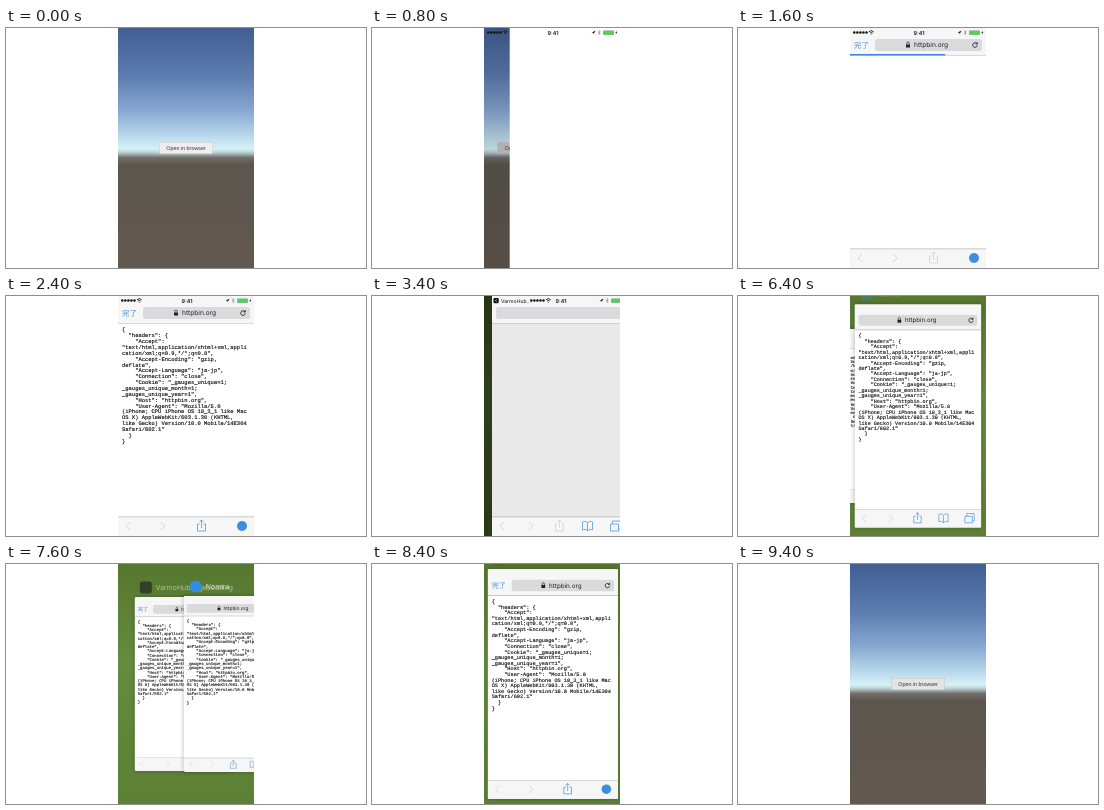
Write an HTML page with a canvas that moves like this. It is 360 px wide and 240 px high and loops after 9600 ms.

```html
<!DOCTYPE html>
<html lang="en">
<head>
<meta charset="utf-8">
<title>Open in browser</title>
<style>
html, body { margin: 0; width: 100%; height: 100%; overflow: hidden; background: #fff; }
canvas { display: block; }
</style>
</head>
<body>
<canvas id="stage" width="360" height="240"></canvas>
<script>
const ctx = document.getElementById('stage').getContext('2d');
ctx.textRendering = 'geometricPrecision';
const LOOP = 9600, STEP = 200, W = 136, H = 240, LEFT = 112;
const BLUE = '#3b8fdf', GREY = '#cdcdcd';
const SANS = 'Inter, "Liberation Sans", sans-serif';
const MONO = '"Liberation Mono", monospace';
const APP = 'VarmoHubPageLoading';

const RESPONSE = `{
  "headers": {
    "Accept":
"text/html,application/xhtml+xml,appli
cation/xml;q=0.9,*/*;q=0.8",
    "Accept-Encoding": "gzip,
deflate",
    "Accept-Language": "ja-jp",
    "Connection": "close",
    "Cookie": "_gauges_unique=1;
_gauges_unique_month=1;
_gauges_unique_year=1",
    "Host": "httpbin.org",
    "User-Agent": "Mozilla/5.0
(iPhone; CPU iPhone OS 10_3_1 like Mac
OS X) AppleWebKit/603.1.30 (KHTML,
like Gecko) Version/10.0 Mobile/14E304
Safari/602.1"
  }
}`.split('\n');

const ICONS = {
  back: 'M2 -4L-2 0L2 4',
  next: 'M-2 -4L2 0L-2 4',
  share: 'M-2 -2H-4V5H4V-2H2M0 2V-6M-2 -4L0 -6L2 -4',
  book: 'M0 -3C-1 -5 -4 -5 -5 -4V4C-4 3 -1 3 0 5C1 3 4 3 5 4V-4C4 -5 1 -5 0 -3V5',
  tabs: 'M-5 -2H3V5H-5ZM-3 -2V-5H5V3H3',
  reload: 'M1.8 -1.4A2.3 2.3 0 1 0 2.3 .4M2.3 -2.8V-1H.6',
  wifi: 'M-2.4 -1A3.4 3.4 0 0 1 2.4 -1M-1.3 .3A1.8 1.8 0 0 1 1.3 .3M-.3 1.5H.3'
};

const clamp = v => Math.min(1, Math.max(0, v));
const mix = (a, b, p) => a + (b - a) * p;
const ramp = (t, from, to) => 1 - (1 - clamp((t - from) / (to - from))) ** 2;

function rect(x, y, w, h, color, radius = 0) {
  ctx.fillStyle = color;
  ctx.beginPath();
  ctx.roundRect(x, y, w, h, radius);
  ctx.fill();
}

function disc(x, y, r, color) {
  ctx.fillStyle = color;
  ctx.beginPath();
  ctx.arc(x, y, r, 0, 7);
  ctx.fill();
}

function text(str, x, y, size, color, { family = SANS, weight = 400, align = 'left', stroke = 0 } = {}) {
  ctx.font = `${weight} ${size}px ${family}`;
  ctx.textAlign = align;
  ctx.fillStyle = ctx.strokeStyle = color;
  ctx.fillText(str, x, y);
  if (stroke) {
    ctx.lineWidth = stroke;
    ctx.strokeText(str, x, y);
  }
}

function shape(path, x, y, color, { width = .7, fill = false } = {}) {
  ctx.save();
  ctx.translate(x, y);
  ctx.fillStyle = ctx.strokeStyle = color;
  ctx.lineWidth = width;
  ctx[fill ? 'fill' : 'stroke'](new Path2D(path));
  ctx.restore();
}

function gradient(y, h, stops) {
  const g = ctx.createLinearGradient(0, y, 0, y + h);
  stops.forEach(([at, color]) => g.addColorStop(at, color));
  return g;
}

function place(x, y, scale, draw) {
  ctx.save();
  ctx.translate(x, y);
  ctx.scale(scale, scale);
  draw();
  ctx.restore();
}

function scene(buttonColor) {
  rect(0, 0, W, H, gradient(0, H, [
    [0, '#425e92'], [.2, '#5c7cb0'], [.34, '#86a6d0'], [.44, '#b4d4ea'],
    [.505, '#d6f1f7'], [.52, '#b5cbcd'], [.54, '#716f69'], [.57, '#5c564f'], [1, '#62584f']
  ]));
  rect(41, 114, 54, 12, '#c2c4c4', 1.2);
  rect(41.5, 114.5, 53, 11, buttonColor, 1);
  text('Open in browser', 68, 122, 5.4, '#323232', { family: '"Liberation Sans", sans-serif', align: 'center' });
}

function statusBar(returnLink) {
  const x = returnLink ? 39.3 : 4.3;
  if (returnLink) {
    rect(1.5, 2, 5.2, 5.2, '#111', 1);
    shape('M.8 -1.3L-.6 0L.8 1.3', 4, 4.6, '#fff', { width: .6 });
    text(APP.slice(0, 8) + '...', 9, 6.6, 5.1, '#111');
  }
  for (let i = 0; i < 5; i++) disc(x + i * 3.05, 4.6, 1.25, '#111');
  shape(ICONS.wifi, x + 17, 4.8, '#111', { width: .9 });
  text('9:41', 69, 6.7, 5.4, '#111', { weight: 600, align: 'center' });
  shape('M2 -2L-2 .2H0V2Z', 109.5, 4.6, '#111', { fill: true });
  shape('M-1 -1L1 1L0 2.2V-2.2L1 -1L-1 1', 115.2, 4.6, '#777', { width: .5 });
  rect(119, 2.4, 11, 4.6, '#8fb591', 1);
  rect(119.4, 2.8, 10.2, 3.8, '#55ce5b', .7);
  shape('M.6 -2L-1 .3H0L-.4 2L1 -.4H0Z', 132.3, 4.6, '#111', { fill: true });
}

function browser({ standalone = false, loaded = true, address = true, bars = true, progress = 0, body = '#fff' }) {
  rect(0, 0, W, H, body);
  if (!bars) return;
  const fieldX = standalone ? 4 : 25, lockX = standalone ? 48 : 58;
  rect(0, 0, W, 27, '#f6f6f6');
  rect(0, 27, W, .6, '#b5b5b5');
  rect(fieldX, 11, 132 - fieldX, 12, '#dadadc', 2.5);
  if (!standalone) text('完了', 4, 19.6, 7.4, BLUE, { family: '"Noto Sans CJK JP", "Noto Sans CJK", sans-serif' });
  if (address) {
    rect(lockX - 2, 16.4, 4, 3.2, '#222', .4);
    shape('M-1.2 1V-.4A1.2 1.2 0 0 1 1.2 -.4V1', lockX, 15.6, '#222');
    text('httpbin.org', lockX + 6, 19.2, 6.6, '#222');
    shape(ICONS.reload, 125, 17, '#222', { width: .9 });
  }
  if (progress) rect(0, 26, W * progress, 1.6, '#3b86e6');
  if (loaded) RESPONSE.forEach((line, i) =>
    text(line, 4, 35.3 + i * 5.87, 5.48, '#111', { family: MONO, stroke: .15 }));

  rect(0, 221, W, 19, '#f6f6f6');
  rect(0, 220.6, W, .6, '#b5b5b5');
  const action = loaded ? BLUE : GREY;
  shape(ICONS.back, 10, 230, GREY);
  if (standalone) {
    shape(ICONS.next, 39, 230, GREY);
    shape(ICONS.share, 67.5, 230, action);
    shape(ICONS.book, 95.5, 230, BLUE);
    shape(ICONS.tabs, 123.5, 230, BLUE);
  } else {
    shape(ICONS.next, 45, 230, GREY);
    shape(ICONS.share, 83.5, 230, action);
    disc(124, 230, 5, BLUE);
  }
}

function wallpaper(dim = 0) {
  rect(0, 0, W, H, gradient(0, H, [[0, '#55772f'], [.4, '#668b3c'], [1, '#5c8034']]));
  if (dim) rect(0, 0, W, H, `rgba(0,0,0,${dim})`);
}

function card(x, y, scale, options) {
  const radius = 11 * (1 - scale);
  place(x, y, scale, () => {
    ctx.save();
    ctx.shadowColor = 'rgba(0,0,0,.3)';
    ctx.shadowBlur = scale < 1 ? 4 : 0;
    rect(0, 0, W, H, '#fff', radius);
    ctx.restore();
    ctx.beginPath();
    ctx.roundRect(0, 0, W, H, radius);
    ctx.clip();
    browser(options);
  });
}

function cardLabel(x, cardY, name, alpha, round) {
  const y = cardY - 9.5;
  ctx.globalAlpha = alpha;
  if (round) disc(x + 6, y, 6, '#2f8fe8');
  else rect(x, y - 6, 12, 12, '#222', 2.5);
  ctx.globalAlpha = alpha * .8;
  text(name, x + 16, y + 2.5, 6.9, '#fff');
  ctx.globalAlpha = 1;
}

// Scene with the in-app browser pushed over it; p = 1 covers the scene.
function push(p, buttonColor, options) {
  place(-34 * p, 0, 1, () => scene(buttonColor));
  if (!p) return;
  rect(0, 0, W, H, `rgba(0,0,0,${.14 * p})`);
  place(W * (1 - p), 0, 1, () => browser(options));
  statusBar(false);
}

function switchApps(t) {
  const p = ramp(t, 3064, 3500), stride = W + 16;
  wallpaper(.55);
  place(-stride * p, 0, 1, () => { browser({}); statusBar(false); });
  place(stride * (1 - p), 0, 1, () => {
    browser({
      standalone: true, loaded: t >= 5200, address: t >= 3800,
      body: t < 4400 ? '#e9e9e9' : '#fff',
      progress: t >= 3800 && t < 5400 ? mix(.1, .905, ramp(t, 3800, 5200)) : 0
    });
    statusBar(true);
  });
}

function switcher(t) {
  const shrink = ramp(t, 6300, 7000), scroll = ramp(t, 7300, 8000), open = ramp(t, 8100, 8600);
  const appX = mix(mix(-20, 2, shrink) + 22 * scroll, 0, open), appY = 33 * (1 - open);
  const topX = 18 * shrink + 71 * scroll + 70 * open, topY = 32 * shrink;
  const visible = shrink * (1 - open);
  wallpaper();
  card(appX, appY, mix(.725, 1, open), {});
  cardLabel(appX + 5, appY, APP, visible * scroll, false);
  if (open < 1) card(topX, topY, mix(1, .733, shrink), { standalone: true });
  cardLabel(topX + 6, topY, 'Nomira', visible, true);
  if (open === 1) statusBar(false);
}

function draw(t) {
  ctx.clearRect(0, 0, 360, 240);
  ctx.save();
  ctx.beginPath();
  ctx.rect(LEFT, 0, W, H);
  ctx.clip();
  ctx.translate(LEFT, 0);
  if (t < 2800) {
    push(ramp(t, 540, 1000), t >= 400 ? '#c8c8c8' : '#eeeeee', {
      bars: t >= 1200, address: t >= 1400, loaded: t >= 1800,
      progress: t >= 1400 && t < 2000 ? mix(.1, .9, ramp(t, 1400, 1800)) : 0
    });
  } else if (t < 6400) switchApps(t);
  else if (t < 8800) switcher(t);
  else push(1 - ramp(t, 8840, 9300), '#e4e4e4', {});
  ctx.restore();
}

function tick() {
  const t = performance.now() % LOOP;
  draw(Math.floor(t / STEP) * STEP);
  requestAnimationFrame(tick);
}
tick();
</script>
</body>
</html>
```
